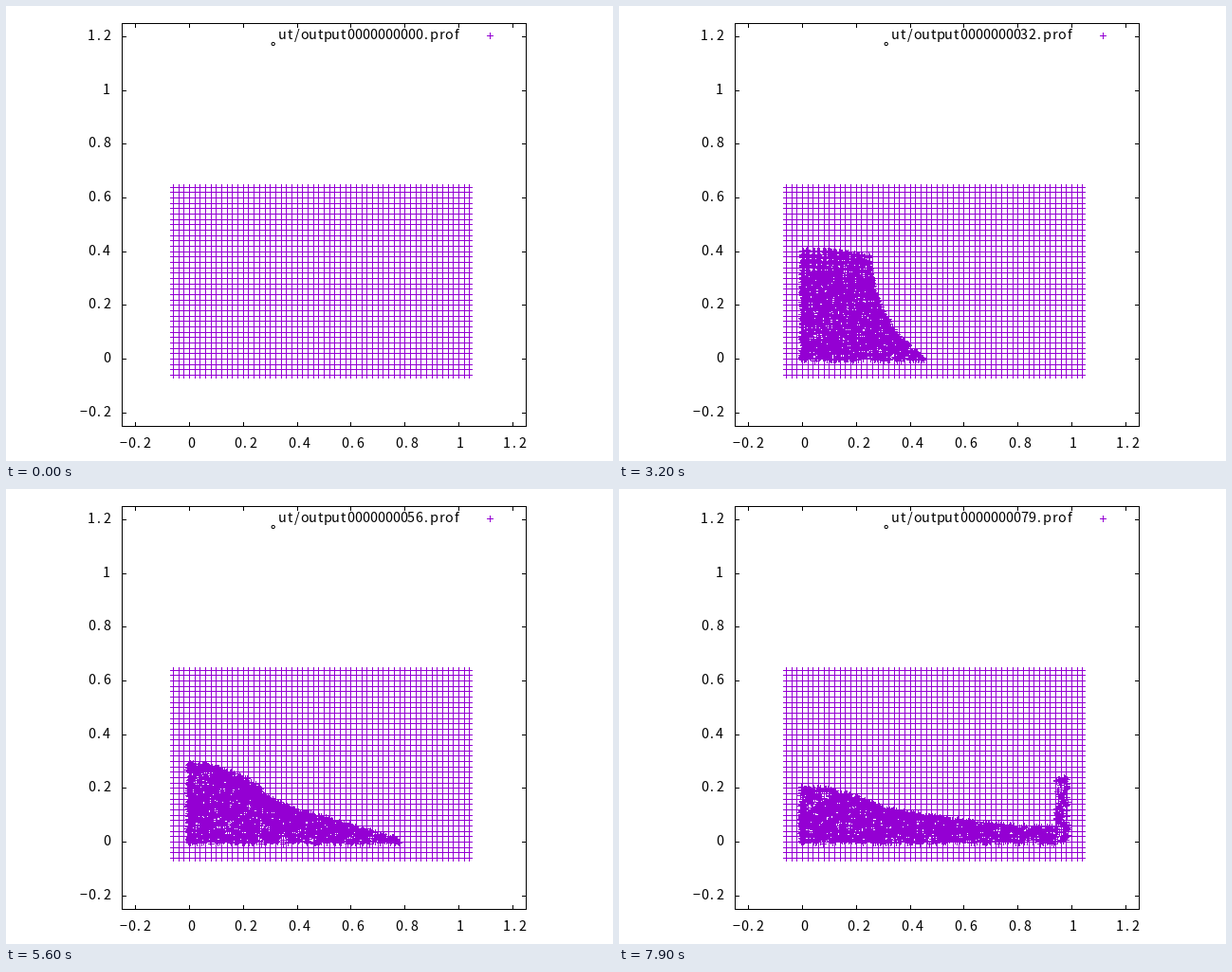
A matplotlib script for the animation above (8000 ms loop, 640x480 px).

```python
import matplotlib.pyplot as plt
import numpy as np
from matplotlib.animation import FuncAnimation
from matplotlib.collections import LineCollection
from matplotlib.patches import Circle

W, H = 640, 480
FRAMES, STEP = 80, 100
PURPLE = "#9400d3"
LEFT, RIGHT, TOP, BOTTOM = 122, 548, 18, 443
CELL = 8
LAYERS, COLS, ROWS = 7, 13, 26
WALL = 0.985


def px(x):
    return LEFT + (np.asarray(x) + 0.25) * (RIGHT - LEFT) / 1.5


def py(y):
    return BOTTOM - (np.asarray(y) + 0.25) * (BOTTOM - TOP) / 1.5


def snap(p):
    """Nearest pixel; halves go up and left."""
    return np.ceil(np.asarray(p) - 0.5 - 1e-6)


def smoothstep(t, a, b):
    s = np.clip((t - a) / (b - a), 0, 1)
    return s * s * (3 - 2 * s)


# Layers of water start on the same lattice and drift apart.
rng = np.random.default_rng(7)
_, V0, U0 = (g.ravel() for g in np.meshgrid(
    range(LAYERS), np.linspace(0, 1, ROWS), np.linspace(0, 1, COLS), indexing="ij"))
JIT_U, JIT_V, DX, DY = rng.uniform(-1, 1, (4, U0.size))
PHASE = rng.uniform(0, 2 * np.pi, U0.size)
SPRAY = rng.uniform(0, 1, U0.size)


def water(t):
    # Disorder spreads from the bottom rows upward.
    mess = smoothstep(t, 8 + 12 * V0, 30 + 25 * V0)
    u = U0 + mess * (JIT_U + 0.3 * np.sin(PHASE + 0.1 * t)) / (COLS - 1)
    v = V0 + mess * (JIT_V + 0.3 * np.cos(PHASE + 0.1 * t)) / (ROWS - 1)
    u, v = np.clip(u, 0, 1), np.clip(v, 0, 1)

    height = 0.5 - 0.516 * t**2 / (t**2 + 4500)
    reach = 0.021 * t**2 / (t + 70)
    sag = 0.3 * smoothstep(t, 22, 58)
    bulge = 0.75 + 0.85 * smoothstep(t, 22, 75)

    # Width at each level; rows are stacked so that each keeps its area.
    s = np.linspace(0, 1, 101)
    width = 0.24 + 0.0003 * t + reach * (1 - s**bulge) ** 2
    area = np.concatenate([[0], np.cumsum(width[1:] + width[:-1])])
    level = np.interp(v, area / area[-1], s)
    u = u * (1 - sag / 3) / (1 - sag * u * u / 3)
    x = u * np.interp(level, s, width)
    y = level * height * (1 - sag * u * u)

    # The front turns upward at the right wall.
    hit = smoothstep(t, 69, 79)
    over = np.maximum(x - WALL, 0)
    y = y * (1 + 0.8 * hit * np.exp(-np.abs(WALL - x) / 0.06)) + 1.5 * over
    x = np.where(over > 0, WALL - 0.04 * SPRAY * np.minimum(over / 0.03, 1), x)
    return x + 0.006 * mess * DX, y + 0.006 * mess * DY


def pluses(x, y):
    x, y = snap(x) + 0.25, snap(y) + 0.25
    across = np.stack([x - 3, y, x + 3, y], -1)
    down = np.stack([x, y - 3, x, y + 3], -1)
    return np.concatenate([across, down]).reshape(-1, 2, 2)


fig = plt.figure(figsize=(W / 100, H / 100), dpi=100, facecolor="white")
ax = fig.add_axes([0, 0, 1, 1])
ax.set_xlim(0, W)
ax.set_ylim(H, 0)
ax.axis("off")


def strokes(segments, color):
    lines = LineCollection(segments, colors=color, linewidths=0.72,
                           antialiaseds=False, capstyle="projecting")
    return ax.add_collection(lines, autolim=False)


def write(x, base, text):
    """Put text on a fixed-pitch cell grid, starting at x."""
    return [ax.text(x + (i + 0.5) * CELL, base, c, size=14.4 * 0.72,
                    family="Noto Sans CJK JP", ha="center", va="baseline")
            for i, c in enumerate(text)]


# Lattice
gx, gy = np.meshgrid(-0.06 + 0.02 * np.arange(56), -0.06 + 0.02 * np.arange(36))
strokes(pluses(px(gx.ravel()), py(gy.ravel())), PURPLE)
drops = strokes(pluses(px(0.24 * U0), py(0.5 * V0)), PURPLE)
strokes(pluses(510, 31), PURPLE)

# Frame, ticks and labels
frame = [(LEFT, TOP, RIGHT, TOP), (LEFT, BOTTOM, RIGHT, BOTTOM),
         (LEFT, TOP, LEFT, BOTTOM), (RIGHT, TOP, RIGHT, BOTTOM)]
for k in range(-1, 7):
    tx, ty = snap(px(k / 5)), snap(py(k / 5))
    frame += [(tx, BOTTOM, tx, BOTTOM - 4), (tx, TOP, tx, TOP + 4),
              (LEFT, ty, LEFT + 4, ty), (RIGHT, ty, RIGHT - 4, ty)]
    label = f"{k / 5:g}".replace("-", "\u2212")
    n = len(label) * CELL
    write(tx + (0 if k < 0 else 2) - n / 2, 466, label)
    write(110 - n, ty + 4, label)
strokes(np.array(frame, float).reshape(-1, 2, 2) + 0.25, "black")

# Key
ax.add_patch(Circle((281.7, 40), 1.6, fill=False, lw=0.72, ec="black"))
title = write(287, 35, "ut/output0000000000.prof")
digits = title[9:19]


def update(n):
    x, y = water(n)
    drops.set_segments(pluses(px(x), py(y)))
    for glyph, c in zip(digits, f"{n:010d}"):
        glyph.set_text(c)
    return [drops, *digits]


anim = FuncAnimation(fig, update, frames=FRAMES, interval=STEP,
                     repeat=True, repeat_delay=0, blit=False)
plt.show()
```
